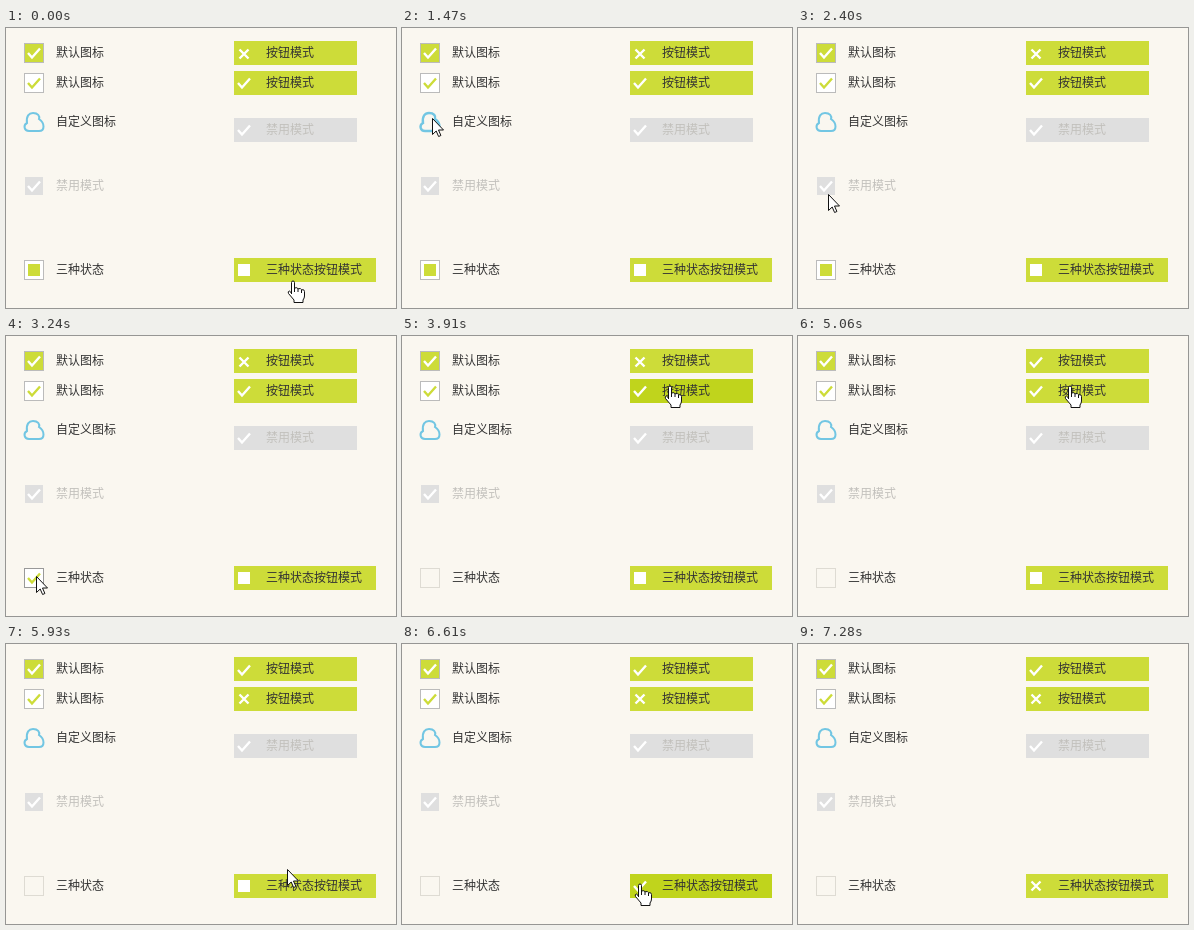
Animation, 390 px wide and 280 px high, one loop 7810 ms. Source, as an HTML page:

```html
<!DOCTYPE html>
<html lang="zh-CN">
<head>
<meta charset="utf-8">
<title>Checkbox styles</title>
<style>
html, body { margin: 0; width: 100%; height: 100%; overflow: hidden; background: #faf7f0; }
svg { display: block; }
text { font: 12px "Noto Sans CJK SC", "Noto Sans CJK", sans-serif; fill: #333; }
.off { fill: #c2c0bc; }
.button { fill: #cddc39; }
.button.hover { fill: #c0d41c; }
.frame { fill: #fff; stroke: #bbb; }
.frame.hover { stroke: #999; }
.frame.empty { fill: #faf7f0; stroke: #dedbd3; }
.line { fill: none; stroke: currentColor; stroke-width: 2.4; }
.white { color: #fff; }
.lime { color: #cddc39; }
#cloud { fill: none; stroke: #72c6e3; stroke-width: 2; }
#cloud.hover { stroke-width: 2.4; }
#cloud.checked { fill: #72c6e3; }
.pointer { fill: #fff; stroke: #111; stroke-linejoin: round; }
</style>
</head>
<body>
<svg width="390" height="280" viewBox="0 0 390 280">
  <defs>
    <path id="check" class="line" d="M-6 0L-2 4.5L6-4.5"/>
    <path id="cross" class="line" d="M-4.5-4.5L4.5 4.5M4.5-4.5L-4.5 4.5"/>
    <path id="square" fill="currentColor" d="M-6-6H6V6H-6Z"/>
    <g id="none"></g>
    <path id="arrow" class="pointer" d="M.5.5V16.5L4.2 13L6.6 18.5L8.9 17.5L6.5 12H11.5Z"/>
    <g id="hand" class="pointer">
      <path d="M-1.5 13V1.5q0-1.5 1.5-1.5t1.5 1.5V7q3-1 3.5.8q3-1 3.5.9q3-.6 3 1.8V15q0 2-1.5 4v2.5H1V19l-5.5-6.5q-1-2 .8-2.5q1 0 2.2 2.5z"/>
      <path d="M1.5 7v4M5 8v3M8.5 9v3"/>
    </g>
  </defs>

  <rect id="box1" class="frame" x="18.5" y="15.5" width="19" height="19" style="fill:#cddc39"/>
  <use href="#check" class="white" x="28" y="25"/>
  <rect id="box2" class="frame" x="18.5" y="45.5" width="19" height="19"/>
  <use href="#check" class="lime" x="28" y="55"/>
  <path id="cloud" d="M23 103C18 103 17 97 21 95C20 88 23 85 27 85C32 85 34 88 33 91C39 95 39 103 33 103Z"/>
  <rect x="19" y="149" width="18" height="18" fill="#dfdfdf"/>
  <use href="#check" class="white" x="28" y="158"/>
  <rect id="triBox" class="frame" x="18.5" y="232.5" width="19" height="19"/>
  <use id="triMark" class="lime" x="28" y="242"/>

  <text x="50" y="28.500">默认图标</text>
  <text x="50" y="58.500">默认图标</text>
  <text x="50" y="98">自定义图标</text>
  <text x="50" y="162" class="off">禁用模式</text>
  <text x="50" y="246">三种状态</text>

  <rect id="button1" class="button" x="228" y="13" width="123" height="24"/>
  <rect id="button2" class="button" x="228" y="43" width="123" height="24"/>
  <rect x="228" y="90" width="123" height="24" fill="#dfdfdf"/>
  <rect id="button3" class="button" x="228" y="230" width="142" height="24"/>
  <g class="white">
    <use id="mark1" x="238" y="26"/>
    <use id="mark2" x="238" y="55"/>
    <use href="#check" x="238" y="102"/>
    <use id="mark3" x="238" y="242"/>
  </g>
  <text x="260" y="28.500">按钮模式</text>
  <text x="260" y="58.500">按钮模式</text>
  <text x="260" y="106" class="off">禁用模式</text>
  <text x="260" y="246">三种状态按钮模式</text>

  <use id="cursor"/>
</svg>
<script>
const LOOP = 7810;
const byId = id => document.getElementById(id);

// Each move: first step, last step (ms), step count, waypoints of the pointer tip.
const moves = [
  [70, 730, 9, [[287, 253], [352, 120], [200, 45], [60, 12], [31, 17]]],
  [940, 1470, 8, [[31, 17], [31, 50], [30, 90]]],
  [1680, 2060, 5, [[30, 90], [29, 87], [30, 94]]],
  [2200, 2400, 4, [[30, 94], [34, 130], [30, 166]]],
  [2590, 3370, 10, [[30, 166], [34, 225], [30, 240], [30, 241]]],
  [3440, 4170, 10, [[30, 241], [110, 190], [200, 110], [268, 50], [270, 46], [270, 33]]],
  [4240, 4640, 5, [[270, 33], [271, 18], [270, 13]]],
  [4790, 4790, 1, [[270, 13], [272, 13]]],
  [4930, 5390, 8, [[272, 13], [272, 42], [272, 58], [270, 62], [270, 62]]],
  [5530, 6270, 11, [[270, 62], [274, 205], [285, 236], [265, 245]]],
  [6340, 6740, 5, [[265, 245], [240, 240], [230, 238]]],
  [6950, 7280, 6, [[230, 238], [238, 258], [250, 285]]]
];

// Values that switch at given times.
const cursorShape = [[0, "hand"], [70, "arrow"], [3760, "hand"], [5600, "arrow"], [6000, "hand"], [7150, "arrow"]];
const marks = {
  triMark: [[0, "square"], [3040, "check"], [3370, "none"]],
  mark1: [[0, "cross"], [4500, "check"]],
  mark2: [[0, "check"], [5390, "cross"]],
  mark3: [[0, "square"], [6500, "check"], [6740, "cross"]]
};
const hovers = {
  box1: [[730, 1070]],
  box2: [[1140, 1270]],
  cloud: [[1400, 2260]],
  triBox: [[2800, 3440]],
  button1: [[4050, 4990]],
  button2: [[3840, 4050], [5120, 5590]],
  button3: [[6060, 7090]]
};

const valueAt = (track, t) => track.filter(([start]) => t >= start).pop()[1];
const isWithin = (spans, t) => spans.some(([a, b]) => t >= a && t < b);

function pointOn(path, p) {
  const s = p * (path.length - 1);
  const i = Math.min(Math.floor(s), path.length - 2);
  return [0, 1].map(k => Math.round(path[i][k] + (path[i + 1][k] - path[i][k]) * (s - i)));
}

function tipAt(t) {
  const move = moves.filter(([start]) => t >= start).pop();
  if (!move) return moves[0][3][0];
  const [start, end, count, path] = move;
  const interval = (end - start) / (count - 1) || 1;
  const step = Math.min(count, Math.floor((t - start + 5) / interval) + 1);
  return pointOn(path, step / count);
}

function draw(t) {
  for (const id in marks) byId(id).setAttribute("href", "#" + valueAt(marks[id], t));
  for (const id in hovers) byId(id).classList.toggle("hover", isWithin(hovers[id], t));
  byId("triBox").classList.toggle("empty", t >= 3370);
  byId("cloud").classList.toggle("checked", t >= 1775 && t < 1965);
  const cursor = byId("cursor");
  cursor.setAttribute("href", "#" + valueAt(cursorShape, t));
  cursor.setAttribute("transform", `translate(${tipAt(t)})`);
}

const started = performance.now();
function tick() {
  draw((performance.now() - started) % LOOP);
  requestAnimationFrame(tick);
}
tick();
</script>
</body>
</html>
```
